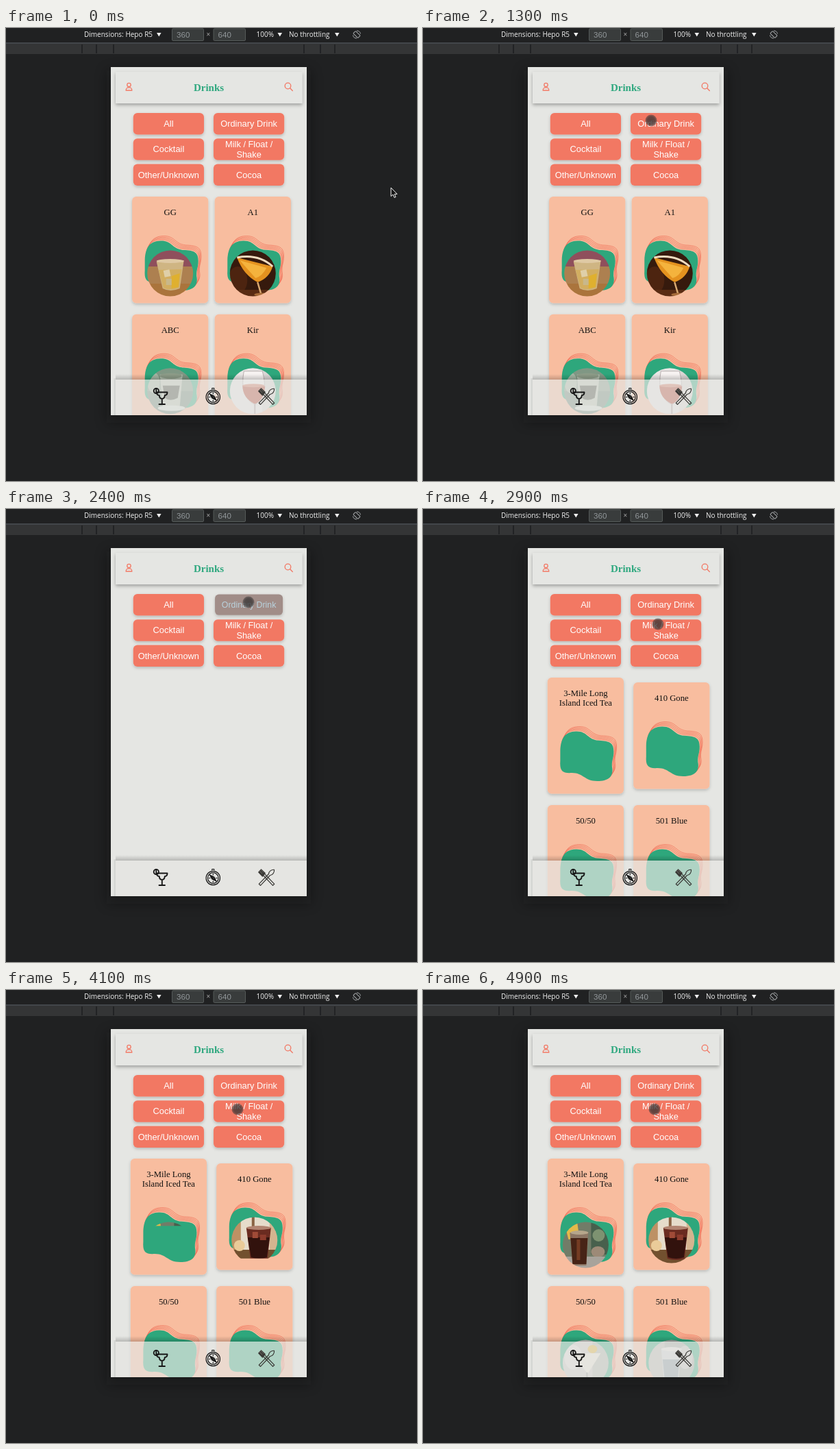
These frames come from a looping animation (600 by 661 pixels, 5000 ms). An HTML page:

```html
<!DOCTYPE html>
<html lang="en">
<head>
<meta charset="utf-8">
<title>Drinks</title>
<style>
html, body { margin: 0; height: 100%; overflow: hidden; background: #202122; }
svg { display: block; width: 100vw; height: 100vh; }
text { white-space: pre; }
.bar { font: 10px "Open Sans", "Noto Sans", sans-serif; fill: #f1f1f1; }
.num { font: 11.6px "Liberation Sans", Arial, sans-serif; fill: #92979a; }
.title { font: 12.7px "Liberation Serif", "Times New Roman", serif; fill: #111; text-anchor: middle; }
.head { font: bold 15px "Liberation Serif", "Times New Roman", serif; fill: #2fa87f; text-anchor: middle; }
.btn { font: 12.85px "Liberation Sans", Arial, sans-serif; fill: #fff; text-anchor: middle; }
.red { fill: none; stroke: #f27864; stroke-width: 1.3; stroke-linecap: round; }
.ink { fill: none; stroke: #171717; stroke-width: 1.9; stroke-linecap: round; stroke-linejoin: round; }
</style>
</head>
<body>
<svg viewBox="0 0 600 661" preserveAspectRatio="none">
  <defs>
    <clipPath id="screen"><rect x="153" y="57" width="286" height="508"/></clipPath>
    <clipPath id="round"><circle r="33.5"/></clipPath>
    <filter id="soft"><feGaussianBlur stdDeviation="0.7"/></filter>
    <filter id="halo" x="-20%" y="-20%" width="140%" height="140%"><feGaussianBlur stdDeviation="9"/></filter>
    <filter id="shade" x="-20%" y="-20%" width="140%" height="150%">
      <feDropShadow dx="0" dy="2" stdDeviation="2" flood-color="#000" flood-opacity=".2"/>
    </filter>
    <filter id="barShade" x="-10%" y="-40%" width="120%" height="180%">
      <feDropShadow dx="0" dy="2.5" stdDeviation="2.8" flood-color="#000" flood-opacity=".3"/>
    </filter>
    <linearGradient id="navShade" x1="0" y1="0" x2="0" y2="1">
      <stop offset="0" stop-color="#000" stop-opacity="0"/>
      <stop offset="1" stop-color="#000" stop-opacity=".2"/>
    </linearGradient>
    <radialGradient id="touchFill">
      <stop offset="0" stop-color="#373434" stop-opacity=".8"/>
      <stop offset=".65" stop-color="#373434" stop-opacity=".75"/>
      <stop offset="1" stop-color="#403c3c" stop-opacity=".5"/>
    </radialGradient>
    <g id="blob">
      <path id="shape" d="M-37 92C-36 74-30 65-14 64.5C4 64 2 78 22 78C36 79 41 82 41 94C41 104 38 106 38.5 116C41 128 36 137 17 137C-2 137-3 125-20 125C-34 126-38 122-37 108Z"/>
    </g>
  </defs>

  <rect width="600" height="661" fill="#202122"/>
  <rect y="21" width="600" height="2" fill="#43464a"/>
  <rect y="23" width="600" height="15" fill="#343536"/>
  <path d="M111 24V37M132 24V37M157 24V37M435 24V37M459 24V37M480 24V37" stroke="#1c1d1e" stroke-width="1.4"/>
  <g class="bar">
    <text x="114" y="13.3">Dimensions: Hepo R5</text>
    <text x="292.5" y="13.3" fill="#aaa">×</text>
    <text x="365.5" y="13.3">100%</text>
    <text x="413" y="13.3">No throttling</text>
    <path d="M220 7h6.6l-3.3 5.6zM396.500 7h6.600l-3.300 5.600zM480 7h6.600l-3.300 5.600z"/>
  </g>
  <g fill="#393c3c" stroke="#555a59">
    <rect x="242.500" y="1" width="46" height="17.500" rx="1.500"/>
    <rect x="303" y="1" width="46.500" height="17.500" rx="1.500"/>
  </g>
  <text class="num" x="249" y="14">360</text>
  <text class="num" x="309.500" y="14">640</text>
  <g fill="none" stroke="#a4a7a9" stroke-width="1" transform="translate(512 9.500)">
    <rect x="-2.500" y="-4.800" width="5" height="9.600" rx="1" transform="rotate(-45)"/>
    <path d="M-5.500 1A5.500 5.500 0 0 0 0 5.500M5.500-1A5.500 5.500 0 0 0 0-5.500"/>
  </g>

  <rect x="147" y="62" width="298" height="514" fill="#111" opacity=".35" filter="url(#halo)"/>
  <g clip-path="url(#screen)">
    <rect x="153" y="57" width="286" height="508" fill="#e5e6e3"/>
    <g id="menuA"></g>
    <g id="menuB"></g>
    <g id="buttons"></g>

    <rect x="160" y="64" width="272.500" height="46" fill="#e5e6e3" filter="url(#barShade)"/>
    <text class="head" x="296" y="92">Drinks</text>
    <g class="red">
      <circle cx="179.500" cy="83" r="2.700"/>
      <path d="M175.200 91C175.200 87 177 86.800 179.500 86.800S183.800 87 183.800 91Z"/>
      <circle cx="411.500" cy="84.500" r="4.300"/>
      <path d="M414.700 87.800L418.300 91.500"/>
    </g>

    <rect x="160" y="505" width="279" height="8" fill="url(#navShade)"/>
    <rect x="157.500" y="511" width="2.500" height="54" fill="#000" opacity=".07"/>
    <rect x="160" y="513" width="279" height="52" fill="#e5e6e3" opacity=".7"/>
    <g class="ink">
      <circle cx="219.300" cy="529.500" r="3.600"/>
      <path d="M219.300 526V533M220 531.500H235.500C235.500 534.500 234 536 231.800 536C231.500 539.500 230 541 227.800 541S224 539.500 223.700 536C221.500 536 220 534.500 220 531.500ZM227.800 541V548.500M223.500 549H232"/>
    </g>
    <g class="ink" style="stroke-width:1.200">
      <circle cx="302.300" cy="538.500" r="10.200"/>
      <circle cx="302.300" cy="538.500" r="7.800"/>
      <path d="M300.800 527V525.500H303.800V527M302.300 532.500V534M302.300 543V544.500M296.300 538.500H298M306.600 538.500H308.300"/>
      <path d="M297.500 534L303.800 537L307 543L300.800 540Z" fill="#171717"/>
      <circle cx="302.300" cy="538.500" r="1" fill="#e5e6e3"/>
    </g>
    <g class="ink" style="stroke-width:1.200;stroke:#393835">
      <path d="M385.500 534.500L371.500 549.300L369.300 547.200L383.500 532.500C383.500 529 387.500 525.800 391.500 526.300C392.200 530.500 389 534.500 385.500 534.500Z"/>
      <path d="M376.500 535.500L389.500 549.300L391.700 547.200L378.500 533.500"/>
      <path d="M372.500 526L378.300 531.500L374.500 536L368.800 530Z" fill="#393835"/>
      <path d="M370 528L374 532M372 526.500L376 530.500" stroke="#aaa79f" stroke-width=".5"/>
    </g>
  </g>

  <circle id="touch" r="8.500" fill="url(#touchFill)"/>
  <path id="arrow" d="M0 0V12.500L3 10L5 14.500L7 13.500L5.200 9.300H9Z" fill="#151515" stroke="#f4f4f4" stroke-width="1"/>
</svg>

<script>
const LOOP = 5000, STEP = 100;
const $ = id => document.getElementById(id);

const box = (x, y, w, h, fill, more = "") =>
  `<rect x="${x}" y="${y}" width="${w}" height="${h}" fill="${fill}" ${more}/>`;
const path = (d, fill, more = "") => `<path d="${d}" fill="${fill}" ${more}/>`;
const spot = (x, y, rx, ry, fill, more = "") =>
  `<ellipse cx="${x}" cy="${y}" rx="${rx}" ry="${ry}" fill="${fill}" ${more}/>`;
const base = fill => box(-34, -34, 68, 68, fill);

// Each photo is a few soft shapes around its own centre.
const photos = {
  tumbler: base("#8f4f5c") + box(-34, -10, 68, 44, "#ad8050") + box(-34, 15, 68, 20, "#aa743c") +
    path("M-20-17L20-19L14 22Q0 28-11 22Z", "#cfb583") +
    path("M-17-5L17-6L13 21Q0 26-10 21Z", "#d2ae61") +
    path("M2 4L14 0L12 20L2 22Z", "#dfb02f") +
    spot(0, -18, 20, 3, "#dfc9a4") + box(-9, -6, 9, 10, "#dfcfa8", 'transform="rotate(-12)"') +
    box(-6, 8, 8, 9, "#c9b88a"),
  martini: base("#361a0d") + spot(-22, 10, 14, 20, "#4d2410") + box(-34, 24, 68, 12, "#5a2c14") +
    path("M-23-23L29-10Q24 7 7 13Q-14 2-23-23Z", "#e4921f") +
    path("M-19-19L20-8Q14 4 4 7Z", "#f4b33d") +
    path("M-23-23Q8-29 29-10", "none", 'stroke="#f0dcc0" stroke-width="3"') +
    path("M7 13L12 30", "none", 'stroke="#d9aa73" stroke-width="2.5"') +
    spot(13, 31, 11, 2.5, "#a76c3a"),
  mug: base("#809784") + box(-34, 0, 68, 34, "#6d8877") + spot(-24, -12, 9, 15, "#a4b5a3") +
    path("M-15-24H18L14 22Q0 28-11 22Z", "#b8c4b4") +
    path("M-11-8H14L11 10Q0 16-8 10Z", "#41483a") + spot(1, -22, 16, 4, "#8d9c88") +
    spot(2, 25, 20, 4, "#d5ddd3"),
  wine: base("#e9e6e5") + box(14, -34, 20, 68, "#dad6d5") +
    path("M-13-29H14Q24 8 3 20Q-20 8-13-29Z", "#f6f2f1", 'stroke="#b9b0b0" stroke-width="1"') +
    path("M-15-8L18-7Q16 14 3 19Q-15 10-15-8Z", "#b5442f") +
    spot(1, -8, 16, 2.5, "#d4765e") +
    path("M3 19V34", "none", 'stroke="#a99" stroke-width="2"'),
  iced: base("#727c68") + box(8, -34, 28, 48, "#48604d") + spot(19, -14, 9, 9, "#7d9271") +
    spot(18, 10, 10, 8, "#9d8a77") + box(-34, 17, 68, 18, "#a8a39b") +
    path("M-30-28L-12-31L-9-10L-25-8Z", "#e3b94a") +
    path("M-23-18H4L1 30H-19Z", "#8d7765") + path("M-22-10H3L1 28H-19Z", "#472416") +
    box(-13, -8, 5, 30, "#743c23") + spot(-9, -18, 13, 3, "#b6a68b"),
  cola: base("#e6dccb") + box(-34, -34, 14, 68, "#bd9164") + box(-4, -34, 4, 30, "#8a6444") +
    box(22, -34, 12, 50, "#d4b48f") + box(-34, 14, 68, 20, "#72502f") + spot(-22, 8, 8, 8, "#eacb99") +
    path("M-12-18H24L19 27Q7 31-6 27Z", "#6a2b20") + path("M-10-4H22L18 25Q7 29-5 25Z", "#32120d") +
    box(-3, -12, 8, 9, "#a04b37") + box(8, -8, 9, 8, "#8c3b2c") + spot(6, -18, 18, 3, "#b28471"),
  coupe: base("#c9c8c5") + box(10, -34, 24, 68, "#aeb5ac") + spot(-18, -8, 13, 18, "#dedbd7") +
    path("M-20-14H22L3 16Z", "#e9e5d7") + spot(10, -20, 7, 6, "#e3b32e") +
    path("M2 14V34", "none", 'stroke="#8f928d" stroke-width="2"'),
  frost: base("#a3a7a3") + box(-34, -34, 24, 68, "#b9b9b4") + spot(20, -8, 11, 17, "#c4c2c0") +
    path("M-15-20H14L10 28H-11Z", "#cdd2d3") + path("M-13-5H12L9 25H-10Z", "#8798a3") +
    spot(0, -20, 15, 3, "#e4e2df")
};

// Centre x, top, photo, title lines, photo load window.
const first = [
  [239.7, 246, "tumbler", ["GG"]],
  [360.3, 246, "martini", ["A1"]],
  [239.7, 417.7, "mug", ["ABC"]],
  [360.3, 417.7, "wine", ["Kir"]]
];
const second = [
  [237.4, 246, "iced", ["3-Mile Long", "Island Iced Tea"], 4050, 4600],
  [362.8, 253, "cola", ["410 Gone"], 3600, 4160],
  [237.4, 432, "coupe", ["50/50"], 4250, 4800],
  [362.8, 432, "frost", ["501 Blue"], 4400, 4900]
];

function card([x, y, photo, lines]) {
  const extra = (lines.length - 1) * 14;
  const rings = [1, 2, 3, 4].map(i =>
    `<use href="#blob" x="${i * 1.05}" y="${i * -1.75}" fill="none" stroke="#f06a52" stroke-width=".65"/>`).join("");
  const text = lines.map((s, i) => `<text class="title" y="${27 + i * 14}">${s}</text>`).join("");
  return `<g transform="translate(${x} ${y})">
    ${box(-55.6, 0, 111.2, 155.5 + extra, "#f8bd9f", 'rx="6" filter="url(#shade)"')}${text}
    <g transform="translate(0 ${extra})">${rings}<use href="#blob" fill="#2ea77c"/>
      <clipPath id="load-${photo}"><rect x="-34" y="-34" width="68" height="68"/></clipPath>
      <g transform="translate(0 112)"><g clip-path="url(#load-${photo})">
        <g clip-path="url(#round)"><g filter="url(#soft)">${photos[photo]}</g></g>
      </g></g>
    </g></g>`;
}

const labels = [["All"], ["Ordinary Drink"], ["Cocktail"], ["Milk / Float /", "Shake"], ["Other/Unknown"], ["Cocoa"]];
function button(lines, i) {
  const x = i % 2 ? 354.6 : 237.4, y = 139.7 + Math.floor(i / 2) * 37.3;
  const text = lines.map((s, k) =>
    `<text class="btn" y="${4.4 + (k - (lines.length - 1) / 2) * 14.4}">${s}</text>`).join("");
  return `<g transform="translate(${x} ${y})"><g>
    ${box(-51.6, -15.8, 103.2, 31.6, "#f27864", 'rx="6" filter="url(#shade)"')}${text}</g></g>`;
}

$("menuA").innerHTML = first.map(card).join("");
$("menuB").innerHTML = second.map(card).join("");
$("buttons").innerHTML = labels.map(button).join("");
const pressed = $("buttons").children[1].firstElementChild;
const loads = second.map(c => [$("load-" + c[2]).firstElementChild, c[4], c[5]]);

// Pointer track: time, x, y.
const track = [
  [0, 562, 233], [100, 553, 190], [200, 522, 95], [300, 472, 26], [400, 432, 14], [500, 394, 72],
  [600, 363, 96], [800, 346, 117], [1000, 337, 130], [1300, 333, 135], [1500, 337, 135],
  [1900, 354, 136], [2400, 354, 136], [2600, 351, 148], [2900, 343, 168], [3000, 343, 165],
  [3300, 342, 145], [3600, 338, 174], [5000, 338, 174]
];
function pointAt(t) {
  const i = track.findIndex(p => p[0] > t);
  const [t0, x0, y0] = track[i - 1], [t1, x1, y1] = track[i];
  const k = (t - t0) / (t1 - t0);
  return [x0 + (x1 - x0) * k, y0 + (y1 - y0) * k];
}

const show = (el, on) => el.setAttribute("display", on ? "inline" : "none");
const clamp = v => Math.max(0, Math.min(1, v));

function draw(t) {
  const [x, y] = pointAt(t), touch = t >= 500;
  show($("arrow"), !touch);
  show($("touch"), touch);
  $(touch ? "touch" : "arrow").setAttribute("transform", `translate(${x} ${y})`);

  show($("menuA"), t < 2400);
  show($("menuB"), t >= 2600);
  for (const [el, from, to] of loads) el.setAttribute("height", 68 * clamp((t - from) / (to - from)));

  const down = t >= 2400 && t < 2500;
  pressed.setAttribute("transform", down ? "scale(.96)" : "");
  pressed.firstElementChild.setAttribute("fill", down ? "#a18d88" : "#f27864");
  pressed.lastElementChild.style.fill = down ? "#b9d3de" : "";
}

const start = performance.now();
function frame() {
  const t = Math.max(0, performance.now() - start) % LOOP;
  draw(Math.floor(t / STEP) * STEP);
  requestAnimationFrame(frame);
}
frame();
</script>
</body>
</html>
```
